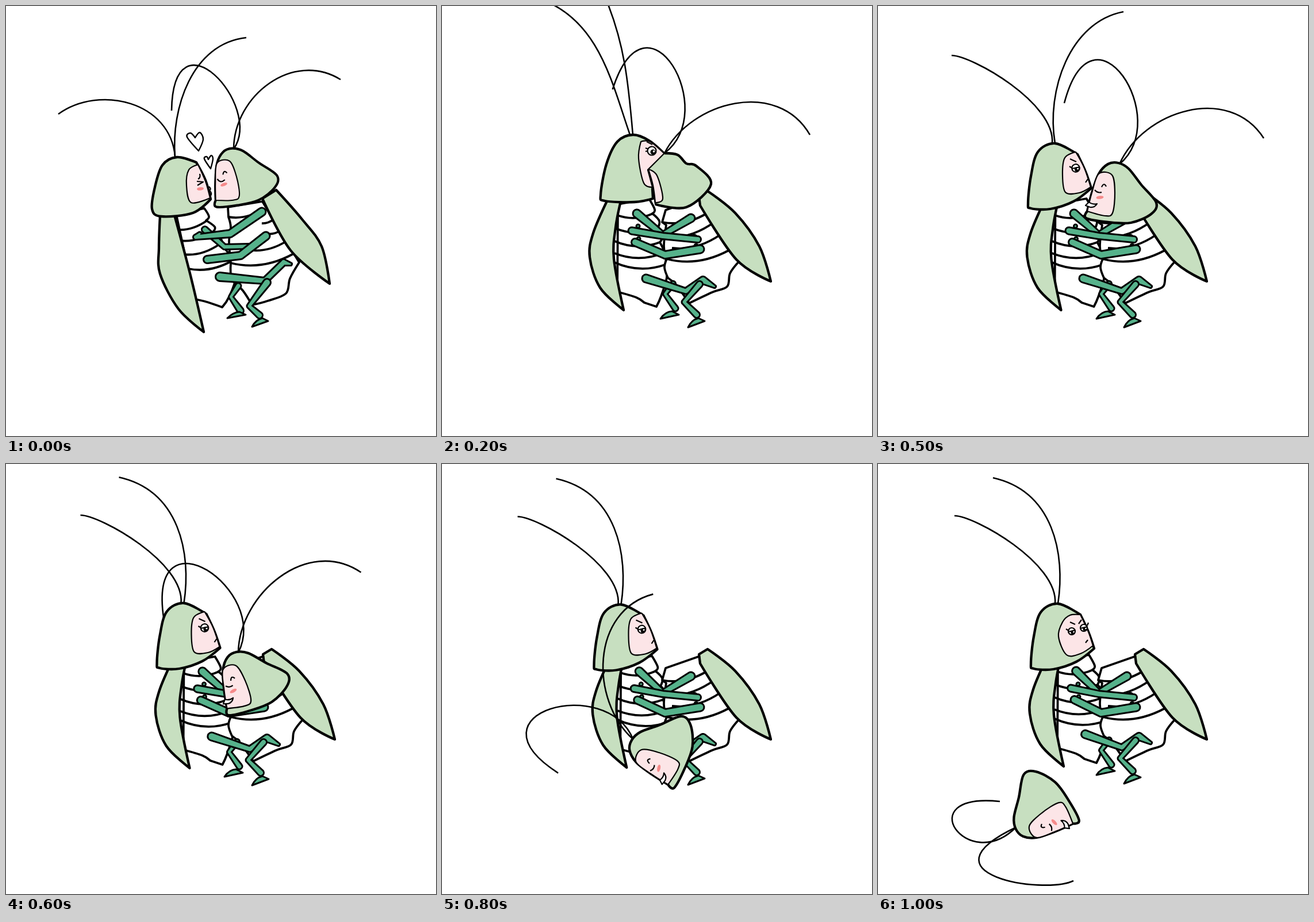
Write an HTML page with a canvas that moves like this. It is 748 px wide and 748 px high and loops after 1500 ms.

```html
<!DOCTYPE html>
<html>
<head>
<meta charset="utf-8">
<style>
html, body { margin: 0; width: 100%; height: 100%; overflow: hidden; background: #fff; }
canvas { display: block; }
</style>
</head>
<body>
<canvas id="stage" width="748" height="748"></canvas>
<script>
const ctx = document.getElementById('stage').getContext('2d');
const GREEN = '#c7dfc0', LIMB = '#56b28b', SKIN = '#fce5e7', BLUSH = '#f58a8a';

// step, left head x y angle, right head x y angle, body drift x y
const POSES = [
  [0, 294, 262, 0, 396, 249, -15, 0, 0],
  [2, 332, 224, 0, 387, 256, 0, 0, 0],
  [4, 307, 234, -6, 362, 261, -7, 1, 1],
  [5, 308, 239, 0, 420, 275, 0, 2.5, 0],
  [7, 311, 245, 0, 388, 381, -46, 4.5, 0],
  [9, 312, 244, 0, 277, 577, -98, 6, -2],
  [10, 313, 243, 0, 240, 632, -128, 7, -3]
];

function poseAt(step) {
  const i = POSES.findIndex(p => p[0] >= step), b = POSES[i];
  if (b[0] === step) return b;
  const a = POSES[i - 1], k = (step - a[0]) / (b[0] - a[0]);
  return a.map((v, n) => v + (b[n] - v) * k);
}

// Smooth path through points; "!" marks a corner
function curve(text, open) {
  const pts = text.split(' ').map(w => [...w.split(',').map(parseFloat), w.endsWith('!')]);
  const n = pts.length, path = new Path2D();
  const at = i => pts[open ? Math.max(0, Math.min(n - 1, i)) : (i + n) % n];
  const pull = (i, k) => at(i)[2] ? 0 : (at(i + 1)[k] - at(i - 1)[k]) / 6;
  path.moveTo(pts[0][0], pts[0][1]);
  for (let i = 0; i < n - (open ? 1 : 0); i++) {
    const a = at(i), b = at(i + 1);
    path.bezierCurveTo(a[0] + pull(i, 0), a[1] + pull(i, 1),
      b[0] - pull(i + 1, 0), b[1] - pull(i + 1, 1), b[0], b[1]);
  }
  if (!open) path.closePath();
  return path;
}

function paint(path, fill, width) {
  if (fill) { ctx.fillStyle = fill; ctx.fill(path); }
  if (width) { ctx.lineWidth = width; ctx.stroke(path); }
}

const shape = (text, fill, width = 4.3) => paint(curve(text), fill, width);
const mark = (d, fill, width = 2.2) => paint(new Path2D(d), fill, width);

function dot(x, y, rx, ry, fill, width = 0) {
  const path = new Path2D();
  path.ellipse(x, y, rx, ry, -0.1, 0, 7);
  paint(path, fill, width);
}

// Sagging lines between pairs of points
function ribs(text) {
  for (const rib of text.split(' ')) {
    const [x1, y1, x2, y2] = rib.split(',').map(Number);
    const sag = (x2 - x1) * 0.2;
    mark(`M${x1},${y1} Q${(x1 + x2) / 2},${(y1 + y2) / 2 + sag} ${x2},${y2}`, null, 3.8);
  }
}

function place(x, y, angle, scale, ax, ay, draw) {
  ctx.save();
  ctx.translate(x, y);
  ctx.rotate(angle * Math.PI / 180);
  ctx.scale(scale, scale);
  ctx.translate(-ax, -ay);
  draw();
  ctx.restore();
}

// Chain of tapered bones through [x, y, radius] joints
function limb(...joints) {
  const path = new Path2D(), q = Math.PI / 2;
  joints.slice(1).forEach(([x2, y2, r2], i) => {
    const [x1, y1, r1] = joints[i], a = Math.atan2(y2 - y1, x2 - x1);
    const bone = new Path2D();
    bone.arc(x1, y1, r1, a + q, a - q);
    bone.arc(x2, y2, r2, a - q, a + q);
    bone.closePath();
    path.addPath(bone);
  });
  paint(path, null, 6);
  paint(path, LIMB);
}

// Cubic through two inner points, from (x0, 0) to (x3, y3)
function feeler([x1, y1, x2, y2, x3, y3], x0 = 0) {
  const near = (a, b, c, d) => (-5 * a + 18 * b - 9 * c + 2 * d) / 6;
  ctx.lineWidth = 2.6;
  ctx.beginPath();
  ctx.moveTo(x0, 0);
  ctx.bezierCurveTo(near(x0, x1, x2, x3), near(0, y1, y2, y3),
    near(x3, x2, x1, x0), near(y3, y2, y1, 0), x3, y3);
  ctx.stroke();
}

function leftFeelers(step) {
  if (step === 0) return [[-40, -73, -120, -99, -203, -74], [8, -88, 48, -167, 124, -207]];
  if (step < 5) return [[-37, -94, -84, -181, -167, -238], [-8, -81, -22, -160, -49, -241]];
  return [
    step === 9 ? [-44, -96, -139, -115, -188, -23] : [-40, -71, -118, -129, -180, -153],
    step === 5 ? [3, -96, 43, -182, 119, -229] : [0, -90, -34, -171, -113, -219]
  ];
}

// Feelers that bend on their own, apart from the head's turn
const BENT = {
  0: [[-4, -91, -67, -146, -108, -67], [30, -84, 101, -133, 186, -121]],
  9: [[-99, 16, -155, 95, -61, 132], [-55, -42, -115, -75, -180, -97]],
  10: [[-62, 66, 13, 98, 100, 93], [-80, 22, -110, -22, -28, -45]]
};
const RIGID = [[28, -104, -28, -180, -96, -106], [70, -74, 168, -96, 251, -45]];

function hugBodies() {
  shape('296,362! 345,352! 353,366 348,373! 363,384 361,392! 375,407 372,414! 387,430 385,436! 397,441! 401,468 393,495 383,515! 376,524! 350,515 328,510!', '#fff', 3.8);
  ribs('297,389,350,373 302,408,361,392 309,432,372,414 317,457,397,441');
  shape('268,364! 266,420 268,466 300,527 344,567! 320,465 293,364!', GREEN);
  shape('386,350! 387,367! 391,385 388,410 391,447! 393,475 412,495 428,520! 455,513 487,500 494,474 510,446! 446,340!', '#fff', 3.8);
  ribs('387,367,450,352 445,378,466,371 452,396,479,390 420,424,488,409 391,447,500,431');
  shape('446,335! 495,425 563,483! 549,418 515,371 470,320!', GREEN);
}

function hugLimbs() {
  limb([346, 389, 4], [380, 419, 3], [424, 418, 3]);
  limb([445, 358, 5.5], [390, 396, 5], [330, 402, 3], [337, 396, 1.5]);
  limb([452, 400, 5.5], [408, 434, 5], [350, 441, 5]);
  limb([404, 487, 3.5], [391, 506, 2], [408, 530, 4]);
  mark('M385,543 Q395,533 406,532 L417,537Z', LIMB, 3);
  limb([372, 471, 6], [450, 478, 4], [483, 446, 4], [495, 449, 1]);
  limb([454, 481, 5], [423, 522, 2.5], [441, 538, 4]);
  mark('M428,558 Q434,546 446,543 L456,548Z', LIMB, 3);
}

function bodies(dx, dy) {
  place(dx, dy, 0, 1, 0, 0, () => {
    shape('306,345! 360,335! 370,354 366,361! 378,374 375,387! 384,400 379,411! 389,433 388,450! 391,472 381,505 373,523! 352,516! 338,507 305,497!', '#fff', 3.8);
    ribs('305,364,367,361 302,387,375,387 300,409,379,411 300,430,384,430 300,446,388,450');
    shape('289,335! 263,395 257,437 275,490 316,529! 299,440 302,385 312,335!', GREEN);
  });
  shape('389,355! 452,333! 516,445! 501,465 496,488 470,498 430,517! 408,486 393,473! 387,455 391,440! 386,418 390,381! 383,376!', '#fff', 3.8);
  ribs('383,376,460,361 392,402,475,375 400,421,484,398 391,440,499,425');
  shape('447,331! 462,322! 510,360 552,418 572,479! 512,441 449,347!', GREEN);
}

function limbs(dx, dy) {
  const at = (x, y, r) => [x + dx * 0.8, y + dy * 0.3, r];
  dot(341 + dx, 383, 3, 3, LIMB, 3);
  dot(439, 402, 4, 4, LIMB, 3);
  limb(at(339, 361, 5.5), [384, 398, 3.5], [433, 369, 5.5]);
  limb(at(330, 391, 4.5), [384, 400, 4], [445, 406, 4]);
  dot(342 + dx, 405, 3, 3, LIMB, 3);
  dot(442, 417, 3, 3, LIMB, 3);
  limb(at(336, 411, 5), [388, 433, 5], [449, 423, 5.5]);
  place(0, dy, 0, 1, 0, 0, () => {
    limb([402, 483, 3], [388, 501, 2], [406, 526, 3.5]);
    mark('M380,544 Q388,532 400,531 L412,537Z', LIMB, 3);
    limb(at(355, 474, 5.5), [424, 496, 3.5], [454, 477, 5], [474, 488, 1]);
    limb([448, 484, 4], [421, 515, 2.5], [443, 537, 4]);
    mark('M428,559 Q434,546 446,543 L457,548Z', LIMB, 3);
  });
}

function eye(x, y, r, lid) {
  dot(x, y, r, r, '#fff', 2.2);
  dot(x + 2, y + 2, r * 0.6, r * 0.6, '#000');
  dot(x + 3.5, y + 1, r * 0.23, r * 0.23, '#fff');
  if (lid) mark(`M${x - r},${y + 1} L${x + r},${y - 2}`);
}

function leftKiss() {
  shape('254,353 259,315 272,277 297,263 331,272! 347,303 356,336! 325,360 270,366', GREEN);
  shape('318,285 334,276! 347,305 355,334! 322,342 314,312', SKIN, 2.2);
  mark('M337,292 Q339,299 334,301 M332,305 L343,306 L333,312 M353,314 Q358,318 354,321 Q360,326 355,331');
  dot(338, 318, 6, 2.8, BLUSH);
}

function leftTurned() {
  shape('276,328 286,275 305,236 332,224 360,234 387,257! 366,318! 367,335! 335,341 283,339', GREEN);
  shape('346,236! 362,236 387,257! 358,285! 366,315! 351,308 342,265', SKIN, 2.2);
  eye(365, 252, 7.5);
  mark('M356,236 l10,5 M354,247 l5,2 M354,253 l4,-1');
}

function leftSide(front) {
  shape('266,347 271,300 283,258 313,243 352,262! 366,292 376,321! 345,344 305,357 271,356', GREEN);
  if (front) {
    shape('334,263 352,262! 366,292 374,316! 352,330 328,332 314,300 321,275', SKIN, 2.2);
    eye(337, 291, 6, true);
    eye(358, 285, 6, true);
    mark('M334,275 l9,4 M349,278 l5,-7 M327,287 l5,3 M364,281 l2,-5 M361,311 l4,-5');
  } else {
    shape('330,268 349,258! 364,286 375,319! 355,329 331,328 326,297', SKIN, 2.2);
    eye(349, 286, 6.8, true);
    mark('M339,270 l11,5 M338,283 l5,3 M366,311 l4,-6');
  }
}

function rightTurned() {
  const back = '387,256! 410,259 425,274 442,278 468,310 425,350 371,345!';
  shape(back + ' 366,310! 358,285!', GREEN, 2.2);
  shape('359,284! 374,295 384,335 371,342! 367,312', SKIN, 2.2);
  paint(curve(back, true), null, 4.3);
}

function rightSide(kiss) {
  shape('384,292 400,275 418,273 436,283 458,311 484,342 475,362 440,377 400,376 362,369 364,357! 372,325', GREEN);
  shape('384,292 407,294 412,325 408,360 395,365 364,357! 372,325', SKIN, 2.2);
  if (!kiss) mark('M367,341 Q373,346 381,344 Q377,351 369,350 L361,347Z', '#fff');
  mark('M389,315 q4,-9 8,-1 M377,320 ' + (kiss ? 'q3,10 13,5' : 'q5,6 12,4'));
  dot(386, 333, 6.5, 2.8, BLUSH);
}

function hearts() {
  shape('335,252! 315,228 321,221 329,229! 337,220 343,232', null, 2.4);
  shape('356,283! 345,266 349,262 352,267! 357,260 360,266', null, 2.4);
}

function draw(now) {
  const step = Math.min(10, Math.floor(now % 1500 / 100));
  const [, lx, ly, la, rx, ry, ra, dx, dy] = poseAt(step);
  const kiss = step === 0, turned = step > 0 && step < 5, bent = BENT[step];
  ctx.fillStyle = '#fff';
  ctx.fillRect(0, 0, 748, 748);
  ctx.strokeStyle = '#000';
  ctx.lineJoin = 'round';

  if (kiss) {
    hugBodies();
    hugLimbs();
    hearts();
    place(lx, ly, la, 1, 294, 262, leftKiss);
  } else {
    bodies(dx, dy);
    limbs(dx, dy);
    if (turned) place(lx, ly, la, 1, 332, 224, leftTurned);
    else place(lx, ly, la, 1, 313, 243, () => leftSide(step === 10));
  }
  if (turned) place(rx, ry, ra, 1, 387, 256, rightTurned);
  else place(rx, ry, ra, kiss ? 0.95 : 1, 420, 275, () => rightSide(kiss));

  place(lx, ly, la * 2, 1, 0, 0, () =>
    leftFeelers(step).forEach((f, i) => feeler(f, i || kiss ? 0 : -5)));
  place(rx, ry, bent ? 0 : ra + (turned ? 3 : 0), 1, 0, 0, () =>
    (bent || RIGID).forEach(f => feeler(f)));
  requestAnimationFrame(draw);
}

draw(performance.now());
</script>
</body>
</html>
```
